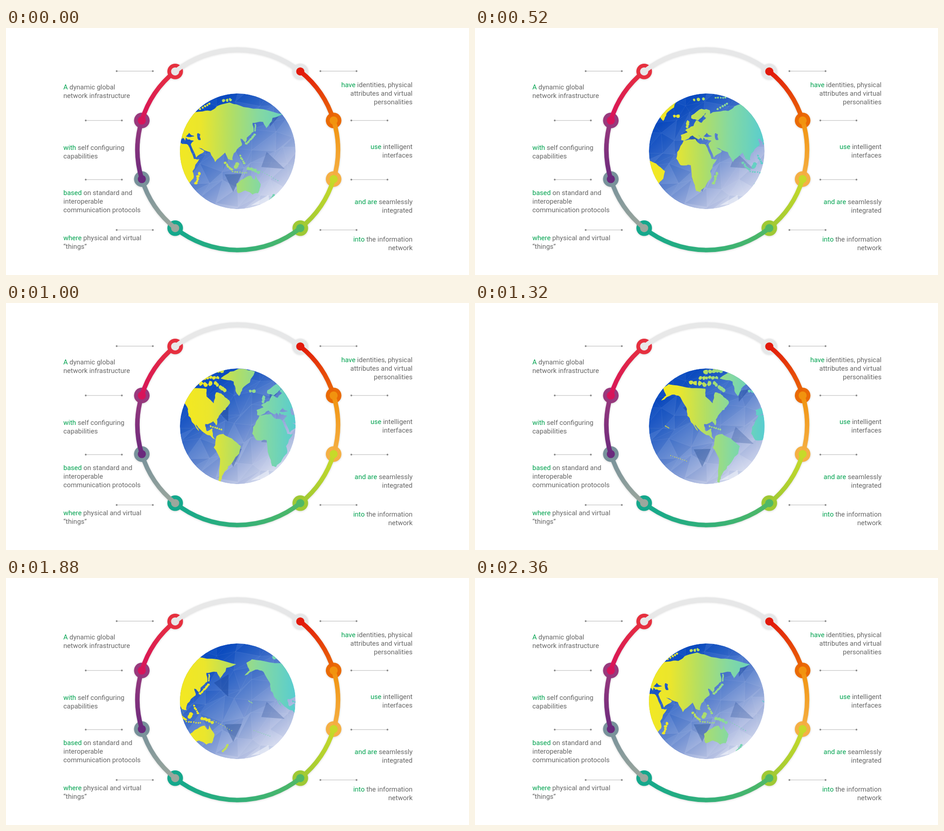
These frames come from a looping animation (1025 by 547 pixels, 2400 ms). An HTML page:

```html
<!DOCTYPE html>
<html lang="en">
<head>
<meta charset="utf-8">
<title>Connected world</title>
<style>
  html, body { margin: 0; width: 100%; height: 100%; overflow: hidden; background: #fff; }
  svg { display: block; width: 100vw; height: 100vh; }
  text { font: 15px Roboto, "Open Sans", sans-serif; fill: #666; }
  .key { fill: #00a24f; }
  #ring { filter: drop-shadow(0 1.5px 2px rgba(0, 0, 0, .16)); }
</style>
</head>
<body>
<svg id="stage" viewBox="0 0 1025 547">
  <defs>
    <linearGradient id="sea" gradientUnits="userSpaceOnUse" x1="440" y1="190" x2="592" y2="382">
      <stop offset="0" stop-color="#0a4bc0"/>
      <stop offset=".22" stop-color="#2e64c7"/>
      <stop offset=".5" stop-color="#6589d0"/>
      <stop offset=".78" stop-color="#a9b7df"/>
      <stop offset="1" stop-color="#d9def0"/>
    </linearGradient>
    <linearGradient id="tint" gradientUnits="userSpaceOnUse" x1="385" x2="641" y1="0" y2="0">
      <stop offset="0" stop-color="#f2e823"/>
      <stop offset=".18" stop-color="#ebe62c"/>
      <stop offset=".45" stop-color="#b0de66"/>
      <stop offset=".68" stop-color="#86d9a0"/>
      <stop offset="1" stop-color="#58cdd0"/>
    </linearGradient>
    <clipPath id="disc"><circle cx="513" cy="273" r="128"/></clipPath>
    <clipPath id="land"></clipPath>
  </defs>
  <g clip-path="url(#disc)">
    <circle cx="513" cy="273" r="128" fill="url(#sea)"/>
    <g id="facets"></g>
    <g clip-path="url(#land)"><rect x="380" y="140" width="266" height="266" fill="url(#tint)"/></g>
  </g>
  <g id="ring"></g>
  <g id="labels"></g>
</svg>
<script>
const LOOP = 2400, STEP = 40, SPEED = 0.207, MAP_WIDTH = 491.5;
const $ = id => document.getElementById(id);

function add(parent, tag, attrs, text) {
  const el = document.createElementNS("http://www.w3.org/2000/svg", tag);
  for (const k in attrs) el.setAttribute(k, attrs[k]);
  if (text) el.textContent = text;
  parent.append(el);
  return el;
}

let seed = 7;
const random = () => (seed = seed * 16807 % 2147483647) / 2147483647;
const jitter = size => (random() * 2 - 1) * size;

// Midpoint displacement turns a few key points into a ragged coast.
function roughen(points) {
  return points.flatMap(([x, y], i) => {
    const [x2, y2] = points[(i + 1) % points.length];
    const size = Math.min(1.6, Math.hypot(x2 - x, y2 - y) * .14);
    return [[x, y], [(x + x2) / 2 + jitter(size), (y + y2) / 2 + jitter(size)]];
  });
}

const outline = points => "M" + points.join(" ") + "z";

// Two copies let the map wrap around.
function land(d, rule) {
  for (const x of [0, -MAP_WIDTH])
    add($("land"), "path", { d, "clip-rule": rule, transform: `translate(${x} 0)` });
}

// Outer coast, then inland seas after "/"
function continent(keys) {
  const shapes = keys.split("/").map(s => s.trim().split(/\s+/).map(p => p.split(",").map(Number)));
  land(shapes.map(s => outline(roughen(roughen(s)))).join(""), "evenodd");
}

// A chain of n ragged islands from one point to another
function islands(x1, y1, x2, y2, n, size) {
  let d = "";
  for (let i = 0; i < n; i++) {
    const k = i / (n - 1), x = x1 + (x2 - x1) * k + jitter(size / 4), y = y1 + (y2 - y1) * k + jitter(size / 4);
    d += outline([0, 1, 2, 3, 4, 5, 6].map(a => {
      const r = size * (.6 + random() * .5), angle = a * 2 * Math.PI / 7;
      return [x + r * Math.cos(angle), y + r * Math.sin(angle)];
    }));
  }
  land(d, "nonzero");
}

// North America, Greenland, South America
continent(`143,188 155,180 195,187 237,190 237,207 253,222 258,198 272,203 283,212 289,220 283,230
  272,241 260,258 259,271 252,262 234,268 238,284 250,278 254,300 263,306 249,298 227,284 213,269
  220,284 205,264 197,250 196,235 181,208 163,203 139,216 150,205`);
continent("268,167 289,152 317,146 344,152 333,176 316,190 309,206 301,192 297,174");
continent("259,295 274,290 293,300 313,317 305,338 292,356 281,370 271,384 268,398 263,396 267,345 253,320");
// Africa
continent(`354,250 380,246 391,257 403,259 416,290 428,290 413,317 415,333 402,352 391,363 382,361
  375,338 370,304 348,304 338,289 340,275`);
// Eurasia with the Black and Caspian seas
continent(`349,248 348,237 363,231 358,226 376,217 382,204 394,210 404,199 399,196 404,188 393,199
  386,205 371,200 371,194 394,179 412,182 413,190 442,183 456,182 472,171 495,165 526,175 570,180
  612,191 590,199 576,222 569,208 546,210 548,230 533,243 530,254 519,245 522,260 504,278 502,293
  492,290 496,303 485,276 463,297 452,275 426,265 439,273 421,287 409,258 416,250 402,247 398,243
  397,250 386,235 392,244 388,247 374,238 355,250
  /398,240 405,232 417,240/424,233 430,235 431,248 426,248`);
// Australia
continent("510,345 526,334 542,327 549,336 553,326 564,346 558,366 546,369 530,360 514,366");

[
  [361, 218, 363, 207, 3, 4.5],   // Britain
  [334, 195, 341, 195, 2, 4.5],   // Iceland
  [378, 160, 398, 158, 3, 4],     // far north
  [425, 155, 447, 154, 5, 2.5],
  [430, 180, 450, 168, 5, 3],
  [481, 160, 497, 159, 3, 4],
  [205, 177, 245, 180, 5, 6],     // Canadian Arctic
  [225, 166, 262, 164, 6, 4.5],
  [238, 153, 272, 149, 5, 6],
  [256, 178, 277, 193, 5, 5],
  [246, 273, 270, 280, 6, 2.5],   // Caribbean
  [427, 323, 421, 344, 5, 4],     // Madagascar
  [486, 299, 499, 314, 5, 3.5],   // Indonesia
  [502, 318, 533, 321, 7, 2],
  [507, 308, 513, 302, 3, 5.5],
  [537, 310, 558, 319, 5, 4.5],   // New Guinea
  [519, 283, 527, 300, 5, 3],     // Philippines
  [532, 256, 551, 236, 8, 3.2],   // Japan
  [551, 227, 552, 214, 5, 2.3],
  [593, 370, 582, 384, 5, 3],     // New Zealand
  [563, 316, 602, 338, 9, 1.2],   // Pacific
  [160, 338, 195, 350, 9, 1.1],
  [148, 272, 156, 277, 4, 1.4]
].forEach(row => islands(...row));

// Low-poly sea: a jittered grid of faint triangles and a few dark ones
function facet(points, fill, opacity) {
  add($("facets"), "polygon", { points: points.join(" "), fill, "fill-opacity": opacity,
    stroke: "#fff", "stroke-opacity": .07, "stroke-width": .6 });
}
const CELL = 37, grid = [];
for (let row = 0; row < 9; row++)
  grid.push(Array.from({ length: 9 }, (_, col) => [365 + col * CELL + jitter(14), 125 + row * CELL + jitter(14)]));
for (let row = 0; row < 8; row++)
  for (let col = 0; col < 8; col++) {
    const [a, b, c, d] = [grid[row][col], grid[row][col + 1], grid[row + 1][col], grid[row + 1][col + 1]];
    for (const points of [[a, b, c], [b, c, d]])
      facet(points, random() < .5 ? "#fff" : "#123f96", random() * .08);
  }
facet(["460,232 493,213 492,263"], "#123f96", .42);
facet(["484,324 522,323 503,363"], "#1f478f", .38);
facet(["577,274 617,312 565,308"], "#2c4f97", .3);
facet(["583,194 608,191 584,219"], "#123f96", .4);
facet(["542,393 581,370 584,387"], "#fff", .45);

// Ring: angle of each node, then the colours of the arc to the next node
const nodes = [
  [51.4, "#e6e7e8", "#e8e8e8"], [128.6, "#e6303f", "#d7145a"],
  [163, "#98397d", "#6b2a7d"], [197, "#77919a", "#9ca79d"],
  [231.4, "#14a88c", "#50b867"], [308.6, "#9fc934", "#c6da2a"],
  [343, "#f5b045", "#f1930f"], [17, "#ea6a05", "#e2190b"]
].map(([deg, from, to]) => {
  const a = deg * Math.PI / 180;
  return { x: 513 + 222 * Math.cos(a), y: 269.7 - 222 * Math.sin(a), from, to };
});
const next = i => nodes[(i + 1) % nodes.length];
const ring = $("ring");
for (const { x, y, from } of nodes) add(ring, "circle", { cx: x, cy: y, r: 17.3, fill: from });
nodes.forEach(({ x, y, from, to }, i) => {
  const { x: x2, y: y2 } = next(i);
  const grad = add(ring, "linearGradient", { id: "arc" + i, gradientUnits: "userSpaceOnUse", x1: x, y1: y, x2, y2 });
  add(grad, "stop", { offset: 0, "stop-color": from });
  add(grad, "stop", { offset: 1, "stop-color": to });
  add(ring, "path", { d: `M${x} ${y}A222 222 0 0 0 ${x2} ${y2}`, fill: "none", stroke: `url(#arc${i})`, "stroke-width": 10 });
});
nodes.forEach(({ to }, i) => add(ring, "circle", { cx: next(i).x, cy: next(i).y, r: 9, fill: to }));

// Pointer lines, mirrored left to right
const labels = $("labels");
[95.5, 204.8, 335.8, 447.2].forEach((y, i) => {
  const left = i % 3 ? 176.5 : 245;
  for (const x of [left, 941 - left]) {
    add(labels, "path", { d: `M${x} ${y}h80`, stroke: "#b4b4b4" });
    for (const cx of [x, x + 80]) add(labels, "circle", { cx, cy: y, r: 2, fill: "#8b8b8b" });
  }
});

// Captions: the first part is highlighted
function caption(x, y, key, lines) {
  lines.forEach((line, i) => {
    const el = add(labels, "text", { x, y: y + i * 19.2, "text-anchor": x > 513 ? "end" : "start" });
    if (!i) add(el, "tspan", { class: "key" }, key);
    el.append((i ? "" : " ") + line);
  });
}
caption(127, 136, "A", ["dynamic global", "network infrastructure"]);
caption(127, 270, "with", ["self configuring", "capabilities"]);
caption(127, 370, "based", ["on standard and", "interoperable", "communication protocols"]);
caption(127, 469.5, "where", ["physical and virtual", "“things”"]);
caption(900, 131, "have", ["identities, physical", "attributes and virtual", "personalities"]);
caption(900, 267.5, "use", ["intelligent", "interfaces"]);
caption(900, 389.5, "and are", ["seamlessly", "integrated"]);
caption(900, 473, "into", ["the information", "network"]);

function draw() {
  const t = Math.floor(performance.now() % LOOP / STEP) * STEP;
  $("land").setAttribute("transform", `translate(${SPEED * t} 0)`);
  $("tint").setAttribute("x1", 385 + 12 * (1 - Math.cos(2 * Math.PI * t / LOOP)));
  requestAnimationFrame(draw);
}
draw();
</script>
</body>
</html>
```
